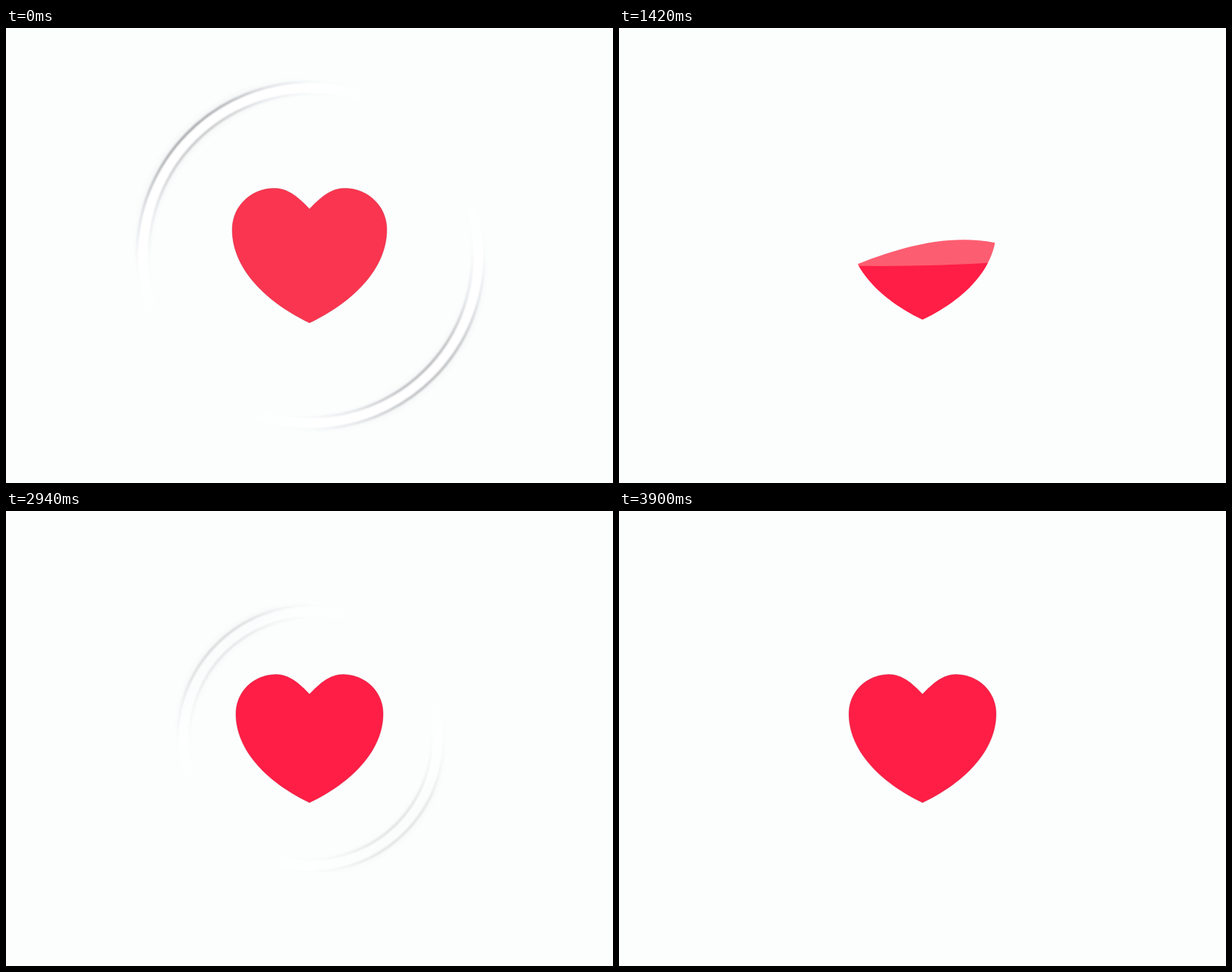
An HTML page for the animation above (4.26 s loop, 800 px wide and 600 px high).

```html
<!DOCTYPE html>
<html lang="en">
<head>
<meta charset="utf-8">
<title>Heart ripple</title>
<style>
html, body { margin: 0; width: 100%; height: 100%; overflow: hidden; background: #fcfefe; }
svg { display: block; width: 800px; height: 600px; }
</style>
</head>
<body>
<svg viewBox="0 0 800 600">
  <defs>
    <clipPath id="heartClip"><path id="clipShape"/></clipPath>
    <linearGradient id="shadeOut" x1="0" y1="0" x2="1" y2="1"/>
    <linearGradient id="shadeIn" x1="0" y1="0" x2="1" y2="1"/>
    <linearGradient id="white" x1="0" y1="0" x2="1" y2="1">
      <stop offset=".25" stop-color="#fff"/>
      <stop offset=".36" stop-color="#fff" stop-opacity="0"/>
      <stop offset=".64" stop-color="#fff" stop-opacity="0"/>
      <stop offset=".75" stop-color="#fff"/>
    </linearGradient>
    <linearGradient id="tint" x1="0" y1="0" x2="1" y2="1">
      <stop offset=".146" stop-color="#b400a8" stop-opacity=".5"/>
      <stop offset=".34" stop-color="#b400a8" stop-opacity="0"/>
      <stop offset=".7" stop-color="#a00030" stop-opacity="0"/>
      <stop offset=".854" stop-color="#a00030" stop-opacity=".12"/>
    </linearGradient>
    <filter id="soft" filterUnits="userSpaceOnUse" x="0" y="0" width="800" height="600">
      <feGaussianBlur stdDeviation="1.2"/>
    </filter>
    <filter id="haze" filterUnits="userSpaceOnUse" x="0" y="0" width="800" height="600">
      <feGaussianBlur stdDeviation="5"/>
    </filter>
  </defs>
  <rect width="800" height="600" fill="#fcfefe"/>
  <g id="ring" fill="none">
    <circle id="glow" cx="401.5" cy="300" stroke="url(#shadeOut)" stroke-width="24" filter="url(#haze)"/>
    <circle id="band" cx="401.5" cy="300" stroke="url(#white)" stroke-width="13"/>
    <circle id="outer" cx="401.5" cy="300" stroke="url(#shadeOut)" stroke-width="3.2" filter="url(#soft)"/>
    <circle id="inner" cx="401.5" cy="300" stroke="url(#shadeIn)" stroke-width="3.2" filter="url(#soft)"/>
  </g>
  <path id="heart" stroke="#c4122f" stroke-opacity=".5" stroke-width=".8"/>
  <g clip-path="url(#heartClip)">
    <path id="back"/>
    <path id="front" fill="#ff1e46"/>
    <circle id="edge" cx="400" cy="300" fill="none" stroke="url(#tint)" stroke-width="16" filter="url(#haze)"/>
  </g>
</svg>
<script>
const LOOP = 4260, HOLD = 420, STEP = 40, CX = 400, CY = 299.6;
const $ = id => document.getElementById(id);
const set = (id, attrs) => {
  for (const k in attrs) $(id).setAttribute(k, attrs[k]);
};
const clamp = v => Math.max(0, Math.min(1, v));
const mix = (a, b, u) => a + (b - a) * u;
const cubic = (a, b, c, d, u) => {
  const v = 1 - u;
  return v * v * v * a + 3 * v * v * u * b + 3 * v * u * u * c + u * u * u * d;
};

// Ring shading peaks at upper left and lower right: [cosine to the diagonal, strength, colour].
const FADE = [
  [1, 1, '#22222a'], [0.95, 0.75, '#262630'], [0.87, 0.38, '#34344c'],
  [0.71, 0.1, '#5c5c90'], [0.55, 0, '#8080c0']
];
function shade(id, upper, lower) {
  const stop = (offset, color, alpha) =>
    `<stop offset="${offset}" stop-color="${color}" stop-opacity="${alpha}"/>`;
  const side = (list, sign, gain) =>
    list.map(([p, a, color]) => stop(0.5 + sign * p * Math.SQRT1_2 / 2, color, a * gain)).join('');
  $(id).innerHTML = side(FADE, -1, upper) + side([...FADE].reverse(), 1, lower);
}
shade('shadeOut', 1, 0.75);
shade('shadeIn', 0.6, 0.8);

// Left half of the heart, from notch to tip; the right half mirrors it.
const CURVES = [
  [400, 242, 385, 226, 372, 216, 356, 216],
  [356, 216, 327, 216, 303, 238, 303, 268],
  [303, 268, 303, 312, 338, 355, 400, 385]
];
const half = [];
for (const [a, b, c, d, e, f, g, h] of CURVES) {
  for (let i = 0; i < 30; i++) {
    half.push([cubic(a, c, e, g, i / 30), cubic(b, d, f, h, i / 30)]);
  }
}
const mirrored = half.slice(1).reverse().map(([x, y]) => [2 * CX - x, y]);
const outline = [...half, [CX, 385], ...mirrored].map(([x, y]) => [x - CX, y - 300]);

// Radial push: outwards inside the ring, inwards just outside it.
function push(dist, r) {
  const u = (dist - r + 6) / 10;
  return -6.6 * u * Math.exp(-u * u / 2);
}

function heartPath(scale, r) {
  const pts = outline.map(([dx, dy]) => {
    const dist = Math.hypot(dx, dy);
    const k = scale * (r > 0 ? 1 + push(dist, r) / dist : 1);
    return (CX + dx * k).toFixed(2) + ' ' + (CY + dy * k).toFixed(2);
  });
  return 'M' + pts.join('L') + 'Z';
}

// Liquid surfaces: time, then four heights of a curve across the heart.
const BACK = [
  [460, 430, 387, 374, 402],
  [1060, 394.5, 310, 291.6, 338],
  [1500, 300, 285, 265, 272],
  [1740, 240, 248, 144, 130],
  [1860, 200, 200, 110, 90]
];
const FRONT = [
  [900, 380, 405, 420, 400],
  [1060, 320, 373, 399, 368],
  [1500, 312, 302, 294, 296],
  [1740, 241, 246, 195, 130],
  [1900, 190, 195, 130, 90]
];

function surface(keys, t) {
  let i = 0;
  while (i < keys.length - 2 && t > keys[i + 1][0]) i++;
  const a = keys[i], b = keys[i + 1];
  const u = clamp((t - a[0]) / (b[0] - a[0]));
  const [y0, y1, y2, y3] = [1, 2, 3, 4].map(n => mix(a[n], b[n], u));
  return `M300 ${y0}C366.7 ${y1} 433.3 ${y2} 500 ${y3}L520 ${y3}V460H280V${y0}Z`;
}

function drawRing(r, power) {
  set('glow', { r, opacity: 0.07 * Math.sqrt(power) });
  set('outer', { r: r + 8, opacity: power });
  set('inner', { r: Math.max(0, r - 8), opacity: power });
  set('band', { r, opacity: clamp(power * 4) });
}

function draw(now) {
  const time = now % LOOP;
  const still = time < HOLD;
  const t = Math.min(3900, HOLD + Math.floor((time - HOLD) / STEP) * STEP);
  const show = on => on ? 'visible' : 'hidden';
  const full = still || t >= 1920;
  const r = still ? 221 : 223 + 0.154 * (t - 3300);
  const ringOn = still || (t > 2400 && t < 3900);
  const shape = heartPath(still ? 1.05 : 1, !still && full ? r : 0);

  set('clipShape', { d: shape });
  set('heart', {
    d: shape,
    fill: still ? '#fa354f' : '#ff1e46',
    visibility: show(full)
  });
  set('ring', { visibility: show(ringOn) });
  if (ringOn) drawRing(r, still ? 0.36 : clamp(0.02 + (Math.max(0, t - 2500) / 1290) ** 2));

  const u = clamp((t - 1060) / 680);
  set('back', {
    d: surface(BACK, t),
    fill: `rgb(${mix(255, 251, u)},${mix(76, 108, u)},${mix(90, 132, u)})`,
    visibility: show(!full && t >= 460)
  });
  set('front', {
    d: surface(FRONT, t),
    visibility: show(!full && t >= 900)
  });
  set('edge', {
    r: Math.max(0, r - 2),
    opacity: clamp((t - 2100) / 300),
    visibility: show(!still && t > 2100 && t <= 2680)
  });
}

const start = performance.now();
function tick() {
  draw(performance.now() - start);
  requestAnimationFrame(tick);
}
tick();
</script>
</body>
</html>
```
